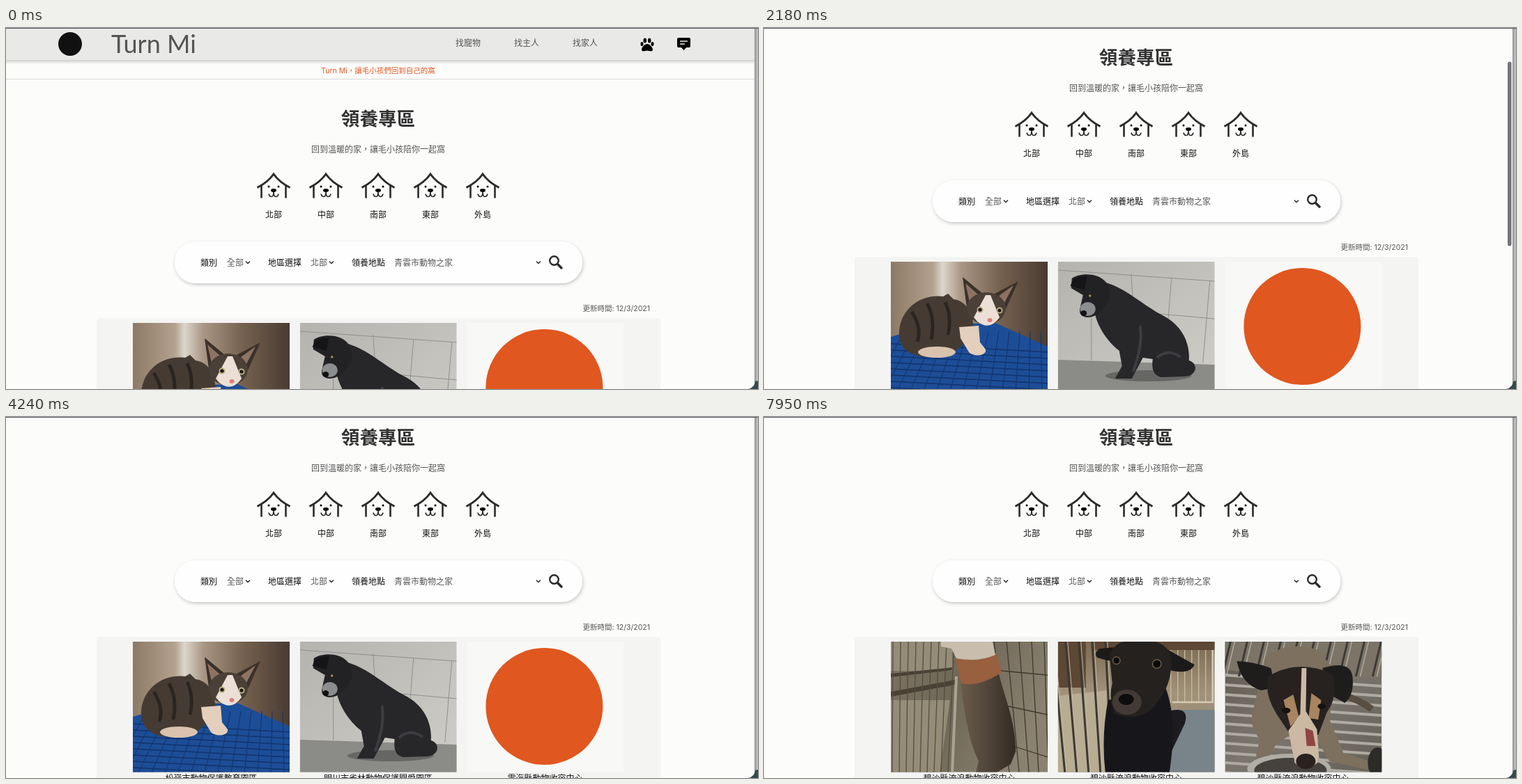
Animation of 1079x519 px, one loop 8000 ms. Source, as an HTML page:

```html
<!DOCTYPE html>
<html lang="zh-Hant">
<head>
<meta charset="utf-8">
<title>領養專區</title>
<style>
  html, body { margin: 0; height: 100%; overflow: hidden; background: #fcfcfb; }
  svg { display: block; }
  text { font: 12px Inter, "Noto Sans CJK TC", "Noto Sans CJK", sans-serif; fill: #555; dominant-baseline: central; text-anchor: middle; }
  .left { text-anchor: start; }
  .dark { fill: #111; font-weight: 500; }
  .line { fill: none; stroke: #2b2b2b; }
</style>
</head>
<body>
<svg width="1079" height="519" viewBox="0 0 1079 519">
  <defs>
    <linearGradient id="fade" x2="0" y2="1"><stop stop-color="#cfcfcb"/><stop offset="1" stop-color="#fcfcfb"/></linearGradient>
    <linearGradient id="edge"><stop stop-color="#8c8c8e"/><stop offset=".5" stop-color="#b2b2b4"/><stop offset="1" stop-color="#c4c4c6"/></linearGradient>
    <linearGradient id="wall">
      <stop stop-color="#8c7966"/><stop offset=".27" stop-color="#b3a28f"/><stop offset=".33" stop-color="#ddd6cc"/>
      <stop offset=".45" stop-color="#a99684"/><stop offset=".7" stop-color="#75614f"/><stop offset="1" stop-color="#493b33"/>
    </linearGradient>
    <linearGradient id="tile" x2="1" y2="1"><stop stop-color="#b5b3ae"/><stop offset="1" stop-color="#d0cec8"/></linearGradient>
    <linearGradient id="room" x2="1" y2=".4"><stop stop-color="#7c7362"/><stop offset=".5" stop-color="#6f6757"/><stop offset="1" stop-color="#8a8171"/></linearGradient>
    <linearGradient id="tabby"><stop stop-color="#6a5c49"/><stop offset=".5" stop-color="#50453a"/><stop offset="1" stop-color="#332a22"/></linearGradient>
    <linearGradient id="yard" x2="0" y2="1"><stop stop-color="#7c6a52"/><stop offset=".4" stop-color="#a1937a"/><stop offset="1" stop-color="#8b806e"/></linearGradient>
    <linearGradient id="steel" x2="1" y2="1"><stop stop-color="#5d574d"/><stop offset=".5" stop-color="#7b766d"/><stop offset="1" stop-color="#656057"/></linearGradient>
    <filter id="soft" x="-10%" y="-30%" width="120%" height="170%"><feDropShadow dx="1" dy="2" stdDeviation="2.5" flood-opacity=".22"/></filter>
    <clipPath id="frame"><rect width="225" height="187.5"/></clipPath>
    <g id="house">
      <path class="line" stroke-width="3" d="M-23.500 22Q-8 14 0 2.500Q8 14 23.500 22"/>
      <path class="line" stroke-width="2.600" d="M-17.500 19V37M17.500 19V37"/>
      <circle cx="-7" cy="20.500" r="1.500"/><circle cx="7" cy="20.500" r="1.500"/>
      <ellipse cy="26" rx="4" ry="2.400"/>
      <path class="line" stroke-width="1.700" d="M-7 31Q-6 35-3 35Q0 35 0 28Q0 35 3 35Q6 35 7 31"/>
    </g>
    <path id="arrow" class="line" stroke-width="1.500" d="M-3-1.500L0 1.500L3-1.500"/>
  </defs>

  <g id="page">
    <rect y="-1" width="1079" height="47" fill="#e9e9e8"/>
    <rect y="46" width="1079" height="6" fill="url(#fade)"/>
    <path d="M0 73.500H1079" stroke="#d9d9d6"/>
    <circle cx="92" cy="23" r="17" fill="#111"/>
    <text class="left" x="151" y="22" style="font:36px Lato,sans-serif">Turn Mi</text>
    <g id="nav"></g>
    <g transform="translate(920 24)">
      <path d="M0-1C4-1 8 4 8 7C8 10 5 9.500 0 8.500C-5 9.500-8 10-8 7C-8 4-4-1 0-1Z"/>
      <ellipse cx="-7.500" cy="-1" rx="2" ry="3"/><ellipse cx="7.500" cy="-1" rx="2" ry="3"/>
      <ellipse cx="-3.200" cy="-6" rx="2.300" ry="3.500"/><ellipse cx="3.200" cy="-6" rx="2.300" ry="3.500"/>
    </g>
    <path d="M965 14H980Q982 14 982 16V26Q982 28 980 28H976L972.500 32L969 28H965Q963 28 963 26V16Q963 14 965 14Z"/>
    <path d="M967 19H978M967 23H974" stroke="#e9e9e8" stroke-width="1.700"/>
    <text x="534" y="61.500" style="font-size:10.5px;fill:#e0571f">Turn Mi，讓毛小孩們回到自己的窩</text>

    <text x="534" y="130" style="font-size:26.6px;font-weight:700;fill:#333">領養專區</text>
    <text x="534" y="174.500">回到溫暖的家，讓毛小孩陪你一起窩</text>
    <g id="areas"></g>

    <rect x="242" y="307" width="585" height="60" rx="30" fill="#fefefe" filter="url(#soft)"/>
    <g id="search"></g>
    <circle class="line" cx="786.500" cy="334.500" r="6.300" stroke-width="2.400"/>
    <path class="line" stroke-width="3.400" stroke-linecap="round" d="M792 340L797 345"/>
    <text x="924" y="403.500" style="text-anchor:end;font-size:10.5px">更新時間: 12/3/2021</text>

    <rect x="130" y="417" width="809" height="300" rx="4" fill="#f4f4f3"/>
    <g id="before"></g>
    <g id="after"></g>
  </g>

  <rect id="bar" x="1067" width="5.500" height="265" rx="2.700" fill="#75757a"/>
  <rect x="1074" width="5" height="519" fill="url(#edge)"/>
  <path d="M1079 507L1075 508Q1074 517 1065 519H1079Z" fill="#34494b"/>
  <path d="M0 .5H1079" stroke="#5b5b66"/>
</svg>

<script>
const $ = id => document.getElementById(id);
const put = (id, html) => $(id).innerHTML += html;
const label = (s, x, y, cls = '') => `<text class="${cls}" x="${x}" y="${y}">${s}</text>`;
const shape = (fill, d) => `<path fill="${fill}" d="${d}"/>`;
const oval = (fill, x, y, rx, ry = rx) => `<ellipse fill="${fill}" cx="${x}" cy="${y}" rx="${rx}" ry="${ry}"/>`;
const lines = (color, width, d) => `<path fill="none" stroke="${color}" stroke-width="${width}" d="${d}"/>`;
const repeat = (n, f) => Array.from({ length: n }, (_, i) => f(i)).join('');
const fill = c => shape(c, 'M0 0H225V188H0Z');

const kitten = fill('url(#wall)')
  + shape('#1c4d97', 'M0 108L60 90L150 88L225 122V188H0Z')
  + lines('#12336c', 1.5, repeat(9, i => `M0 ${118 + i * 9}L225 ${130 + i * 9}`))
  + lines('#12336c', 1, repeat(16, i => `M${i * 15 + 20} 100L${i * 19 - 30} 188`))
  + shape('#463b32', 'M12 100C14 70 40 46 75 50L82 46L90 54C108 56 120 75 118 98C115 118 98 120 92 130L50 137C22 134 10 120 12 100Z')
  + lines('#2b2521', 5, 'M30 72Q45 95 38 115M52 60Q64 82 58 112M78 58Q88 80 82 105')
  + oval('#d9c3ae', 66, 130, 27, 8)
  + shape('#e4cfbc', 'M98 94L126 92L128 116L136 126C138 136 118 137 112 130L100 110Z')
  + shape('#3b312b', 'M103 22L109 66L132 46ZM183 28L149 46L165 68Z')
  + shape('#8e7263', 'M107 31L113 58L125 47ZM176 34L155 49L163 59Z')
  + oval('#4b4038', 137, 67, 28, 23)
  + shape('#ecdfd6', 'M136 48L143 48L156 80Q142 100 124 86L119 80Z')
  + oval('#bfae83', 128, 69, 4.5) + oval('#bfae83', 156, 70, 4.5) + oval('#191512', 128, 69, 2.6) + oval('#191512', 156, 70, 2.6)
  + oval('#dc8077', 142, 84, 3.5, 3);

const sitter = fill('url(#tile)')
  + lines('#8f8f8c', 1, 'M0 12L225 28M90 70L225 82M105 17L108 60M163 24L158 86M218 28L208 145M48 80V142')
  + shape('#8b8b87', 'M0 141L225 148V188H0Z')
  + oval('#666664', 130, 164, 62, 8)
  + shape('#27272a', 'M56 27C92 32 120 62 150 77C180 92 190 120 188 142C202 146 200 164 182 165L148 166C138 164 134 156 136 140L122 138L106 168H82L92 150L88 128C70 114 56 92 52 70Z')
  + lines('#3d3d41', 4, 'M118 92Q122 120 108 158M142 138Q158 124 176 137')
  + shape('#222225', 'M20 24C30 16 62 14 72 34C82 54 64 72 52 78C40 83 28 78 32 66L36 48L19 38Z')
  + shape('#151518', 'M18 35Q22 19 42 21L38 40Z')
  + oval('#8b8d8e', 43, 68, 11, 10) + oval('#111', 37, 74, 4.5, 4) + oval('#b09157', 46, 49, 1.7);

const climber = fill('url(#room)')
  + shape('#958c78', 'M0 0H88V42H0ZM0 84H85L70 188H0Z')
  + shape('#4a4135', 'M0 72L92 55V62L0 79ZM0 46L88 37V41L0 51Z')
  + lines('#544c3f', 1.3, repeat(9, i => `M${i * 11 + 3} 0L${i * 10 + 2} 188`))
  + lines('#3f392e', 1.3, repeat(5, i => `M${148 + i * 18} 0L${170 + i * 14} 188`) + 'M150 41L225 48M160 91L225 105M175 150L225 166')
  + lines('#aaa392', 4, 'M94 50L88 188')
  + shape('url(#tabby)', 'M100 56L154 42C161 75 180 115 179 158L172 176L152 188H122L126 171C112 145 105 100 100 56Z')
  + shape('#98603f', 'M92 22L152 17L159 44Q126 66 101 60Z')
  + shape('#c9bdae', 'M72 0H146L150 19Q125 30 94 24L87 10L72 7Z');

const guard = fill('url(#yard)')
  + shape('#5d4735', 'M0 0H40V66H0ZM50 0H225V12H50Z')
  + shape('#b8ac93', 'M0 78L70 70V188H0Z') + shape('#78838a', 'M150 98H225V188H150Z')
  + lines('#c9bd9f', 1.3, repeat(7, i => `M${162 + i * 10} 12V88`))
  + lines('#d5ccb3', 2.5, 'M164 87H222V12')
  + lines('#3d3932', 3, repeat(5, i => `M${i * 19 - 8} 0L${i * 17 + 10} 188`))
  + lines('#bdb5a2', 1, repeat(5, i => `M${i * 19 - 5} 0L${i * 17 + 13} 188`))
  + shape('#1d1b1e', 'M158 100Q190 92 182 118L158 168Z')
  + shape('#17161b', 'M72 84L154 65Q172 110 160 188H68Q62 135 72 84Z')
  + shape('#1c1a19', 'M80 8L60 10Q50 17 57 23Q68 27 78 28ZM155 10L196 33Q190 48 160 41Z')
  + shape('#25211f', 'M74 18Q84 0 96 0H140Q158 5 163 24Q164 62 142 88Q122 117 82 104Q72 82 78 60Z')
  + oval('#433a35', 99, 87, 21, 18) + oval('#0e0d0d', 98, 83, 11, 8)
  + oval('#6e5a45', 84, 27, 6) + oval('#6e5a45', 142, 32, 7) + oval('#0a0a0a', 84, 27, 4.5) + oval('#0a0a0a', 142, 32, 5.5);

const eater = fill('url(#steel)')
  + lines('#aeaaa2', 4, repeat(11, i => `M0 ${48 + i * 14}L225 ${64 + i * 14}`))
  + shape('#7b7467', 'M0 0H225V50L130 60L0 40Z')
  + lines('#3d3a34', 3, repeat(10, i => `M${i * 24 + 8} 0L${i * 24 - 4} 50`))
  + lines('#b0aba1', 1.5, repeat(10, i => `M${i * 24 + 14} 0L${i * 24 + 2} 50`))
  + shape('#7d705f', 'M58 22Q90-2 134 12L160 45L150 112L170 160L208 172L204 184L150 172L120 120L75 145L52 185H40L50 140Q32 120 42 92Z')
  + lines('#594e42', 10, 'M166 76Q190 82 211 97')
  + shape('#1f1c1c', 'M66 38Q38 28 17 28Q24 62 52 70L72 66ZM140 38Q180 26 183 50Q186 76 172 88L145 73Z')
  + shape('#272220', 'M62 50Q104 24 154 46Q164 76 146 102L134 134H94L74 104Q56 75 62 50Z')
  + shape('#a98461', 'M84 84L98 76L106 108L94 122ZM124 74L138 84L134 112L120 110Z')
  + shape('#cbb9a4', 'M110 38L117 38L116 100L132 126L135 168Q115 186 100 174L91 128L108 104Z')
  + shape('#8f4540', 'M115 124L126 128L130 150L118 158Z')
  + oval('#16120f', 88, 99, 6, 4) + oval('#16120f', 139, 93, 6, 4)
  + oval('#b0ada5', 92, 183, 60, 22) + oval('#45423d', 94, 185, 52, 18)
  + shape('#cbb9a4', 'M97 150H134L133 174Q115 188 100 174Z') + oval('#2a2221', 116, 172, 14, 11)
  + oval('#2d2b28', 219, 174, 14, 22);

const blank = fill('#f8f8f7') + oval('#e0571f', 111, 93, 84);

const card = (art, name, i) =>
  `<g transform="translate(${182 + i * 239.7} 424)" clip-path="url(#frame)">${art}</g>`
  + label(name, 294.5 + i * 239.5, 620.5, 'dark');
const cards = (id, list) => put(id, list.map(([art, name], i) => card(art, name, i)).join(''));

const coast = '碧沙縣流浪動物收容中心';
cards('before', [[kitten, '松嶺市動物保護教育園區'], [sitter, '明川市雀林動物保護關愛園區'], [blank, '雲海縣動物收容中心']]);
cards('after', [[climber, coast], [guard, coast], [eater, coast]]);

put('nav', ['找寵物', '找主人', '找家人'].map((s, i) => label(s, 663 + i * 84, 21.5)).join(''));
put('areas', ['北部', '中部', '南部', '東部', '外島'].map((s, i) =>
  `<use href="#house" x="${384 + i * 75}" y="207.5"/>` + label(s, 384 + i * 75, 268, 'dark')).join(''));
put('search', [['類別', 279], ['地區選擇', 376], ['領養地點', 496]].map(([s, x]) => label(s, x, 337, 'left dark')).join('')
  + [['全部', 317], ['北部', 437], ['青雲市動物之家', 557]].map(([s, x]) => label(s, x, 337, 'left')).join('')
  + [347, 467, 764].map(x => `<use href="#arrow" x="${x}" y="337"/>`).join(''));

const clamp = v => Math.max(0, Math.min(1, v));

function draw(now) {
  const t = now % 8000;
  const u = Math.max(0, t - 1850) / 66.7;
  const scroll = Math.round(101 * (1 - (1 + u + u * u / 2) * Math.exp(-u)));
  $('page').setAttribute('transform', `translate(0 ${-scroll})`);
  $('bar').setAttribute('y', 4.5 + scroll / 2);
  $('bar').setAttribute('opacity', Math.min(clamp((t - 1960) / 150), clamp((3850 - t) / 250)));
  const swapped = t >= 6690;
  $('before').style.display = swapped ? 'none' : '';
  $('after').style.display = swapped ? '' : 'none';
}

const start = performance.now();
function tick() {
  draw(performance.now() - start);
  requestAnimationFrame(tick);
}
tick();
</script>
</body>
</html>
```
